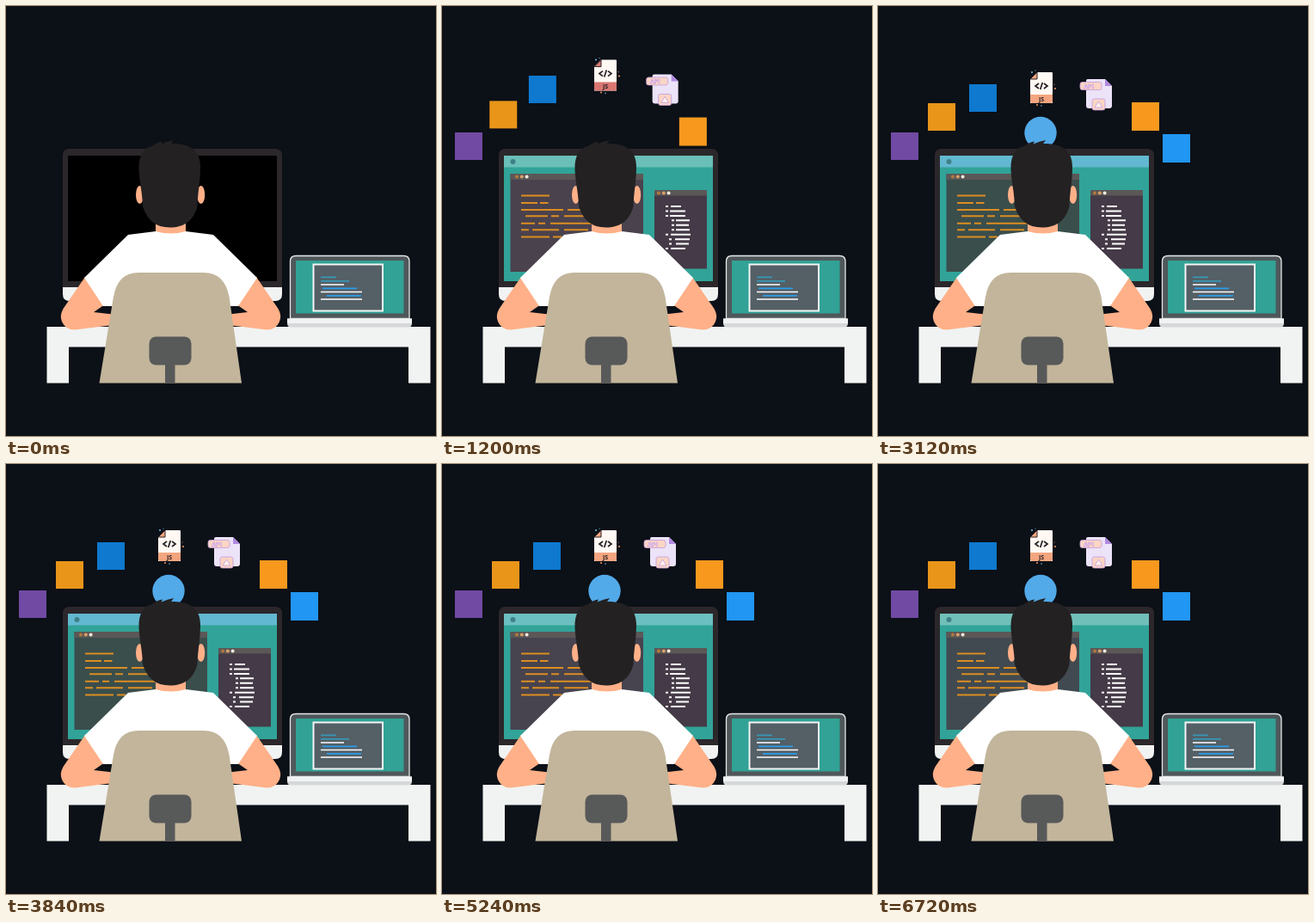
Write an HTML page that moves like this. It is 500 px wide and 500 px high and loops after 6.76 s.

```html
<!DOCTYPE html>
<html lang="en">
<head>
<meta charset="utf-8">
<title>Developer at a desk</title>
<style>
  html, body { margin: 0; width: 100%; height: 100%; overflow: hidden; background: #0c1017; }
  svg { display: block; width: 100%; height: 100%; }
  text { font-family: "Open Sans", Arial, sans-serif; font-weight: 700; text-anchor: middle; }
</style>
</head>
<body>
<svg viewBox="0 0 500 500">
  <rect width="500" height="500" fill="#0c1017"/>

  <!-- Icons, drawn around their own centres -->
  <g id="icons">
    <rect x="-16" y="-16" width="32" height="32" fill="#704aa3"/>
    <rect x="-16" y="-16" width="32" height="32" fill="#e89519"/>
    <rect x="-16" y="-16" width="32" height="32" fill="#0e79cf"/>
    <g>
      <path d="M-5 -18H12Q13 -18 13 -17V18H-13V-10Z" fill="#fff8f3"/>
      <path class="accent" d="M-5 -18V-10H-13Z" stroke="#252124" stroke-width="1"/>
      <path class="accent" d="M-13 8H13V16Q13 18 11 18H-11Q-13 18 -13 16Z"/>
      <path d="M-3 -5L-7 -2L-3 1M3 -5L7 -2L3 1M1.3 -6L-1.3 2" fill="none" stroke="#252124" stroke-width="1.7"/>
      <text y="15.8" font-size="7" fill="#252124">JS</text>
      <g fill="#f29b6c">
        <circle cx="16" cy="1" r="1"/><circle cx="-5" cy="20" r="1"/><circle cx="15" cy="-4" r=".6"/>
      </g>
      <g fill="#71c4e6">
        <circle cx="-11" cy="-18" r="1"/><circle cx="-7" cy="-20" r=".6"/><circle cx="0" cy="21" r=".8"/>
      </g>
    </g>
    <g>
      <path d="M-12 -18H8L16 -10V13Q16 16 13 16H-11Q-14 16 -14 13V-16Q-14 -18 -12 -18Z" fill="#ece3f8"/>
      <path d="M8 -18V-10H16Z" fill="#b18ae0"/>
      <g fill="#fbd5c5" stroke="#c39bdf" stroke-width=".8">
        <rect x="-21" y="-14.5" width="25" height="9" rx="2.5"/>
        <rect x="-7" y="5" width="15" height="13" rx="2.5"/>
        <path d="M.5 8L5 15H-4Z" fill="#fff1ec"/>
      </g>
      <text x="-11" y="-7.3" font-size="7" fill="#fff5ff" stroke="#b884d8" stroke-width=".5">API</text>
    </g>
    <rect x="-16" y="-17" width="32" height="33" fill="#f8991e"/>
    <rect x="-16" y="-17" width="32" height="33" fill="#2196f3"/>
    <circle r="18.7" fill="#52aae9"/>
  </g>

  <!-- Monitor -->
  <path d="M66 326H321V335Q321 343 313 343H74Q66 343 66 335Z" fill="#f1f3f3"/>
  <path d="M66 327V174Q66 166 74 166H313Q321 166 321 174V327Z" fill="#2b272a"/>
  <rect x="72" y="174" width="243" height="146" fill="#000"/>
  <g id="screen">
    <rect x="72" y="174" width="243" height="146" fill="#31a398"/>
    <rect id="bar" x="72" y="174" width="243" height="13.5"/>
    <circle cx="82.5" cy="181" r="3" fill="#3f8087"/>
  </g>
  <g id="windows">
    <rect id="editor" x="79.5" y="195" width="154.5" height="114"/>
    <rect x="79.5" y="195" width="154.5" height="7" fill="#5b5757"/>
    <rect x="247" y="214" width="61" height="91.5" fill="#453a47"/>
    <rect x="247" y="214" width="61" height="6.5" fill="#5b5757"/>
    <path id="code" stroke="#dc8d20" stroke-width="2"/>
    <path id="list" stroke="#fff" stroke-width="2"/>
    <g id="dots"></g>
  </g>

  <!-- Desk -->
  <path d="M47.5 373H493.5V438.500H468V396.500H73V438.500H47.500Z" fill="#f1f3f2"/>

  <!-- Laptop -->
  <path d="M330.500 363.500V297Q330.500 290.500 337 290.500H462.500Q469 290.500 469 297V363.500Z" fill="#50575b" stroke="#e6e9e9" stroke-width="1.3"/>
  <rect x="337" y="296" width="125.500" height="61.500" fill="#31a295"/>
  <rect x="357.500" y="300.500" width="80.500" height="54" fill="#545f66" stroke="#f3f5f5" stroke-width="2"/>
  <path d="M327 363.500H472V369Q472 373.500 467 373.500H332Q327 373.500 327 369Z" fill="#d5d8d9"/>
  <rect x="327" y="363.500" width="145" height="5.500" fill="#f1f3f3"/>
  <g stroke-width="1.700">
    <path d="M366 315.300H384M366 319.800H399" stroke="#3896b4"/>
    <path d="M366 324H393M366 332.500H414M366 341H414" stroke="#fff"/>
    <path d="M368 328.300H408M373 336.800H413" stroke="#2b9ce8"/>
  </g>

  <!-- Person -->
  <g fill="#ffb088">
    <path id="arm" d="M92 315L66.500 352Q62 360 65 367Q69 376.500 80 376.500L124 371V358.500L102 356L115 347Z"/>
    <use href="#arm" transform="translate(383 0) scale(-1 1)"/>
    <path d="M174 242H209V268H174Z"/>
    <ellipse cx="155.500" cy="219.500" rx="4.500" ry="10.500"/>
    <ellipse cx="226.700" cy="219.500" rx="4.500" ry="10.500"/>
  </g>
  <path d="M142 266L174 262Q191.500 267 209 262L241 266L292 316L270 349H113L91 316Z" fill="#fff"/>
  <path d="M154.500 190C154 174 160 165 170 163Q176 158 182 157.500L180.500 160.500Q188 157 195 156L192 160C212 160 226 166 226 187C226 204 223 216 222.500 233C218 250 207 257.500 190.500 257.500C174 257.500 164 249 159 233C158.500 216 155 204 154.500 190Z" fill="#232122"/>

  <!-- Chair -->
  <path d="M108.500 438.500L125 338Q130 310 154 310H230Q254 310 259.500 338L274 438.500Z" fill="#c2b59b"/>
  <rect x="166.500" y="384.500" width="49" height="33" rx="8" fill="#585959"/>
  <rect x="185" y="416" width="11.500" height="22.500" fill="#585959"/>
</svg>
<script>
const LOOP = 6760, TICK = 40;
const FLIGHT = 800, FIRST = 385, STAGGER = 121;
const HOME = [190, 240];
// Resting place and launch slot of each icon
const RESTS = [
  [31, 163, 0], [74, 129, 1], [122, 107, 2], [190, 95, 3],
  [256, 103, 4], [311, 129, 5], [347, 166, 6], [189, 147.500, 8]
];
// Start time, editor and bar tints
const TINTS = [
  [0, "#4a424d", "#6abfb9"],
  [1440, "#4b434e", "#61c4c4"],
  [2800, "#3a4e4c", "#62b8d0"],
  [4840, "#47434f", "#6cbfc0"],
  [6200, "#414a50", "#70c0b9"]
];
const $ = id => document.getElementById(id);
const clamp = x => Math.max(0, Math.min(1, x));
const icons = [...$("icons").children];
const accents = document.querySelectorAll(".accent");

// Rows are [y, x1, x2, x1, x2, ...]
const dashes = rows => rows.map(([y, ...xs]) =>
  xs.map((x, i) => (i % 2 ? "H" + x : `M${x} ${y}`)).join("")).join("");

$("code").setAttribute("d", dashes([
  [220.500, 92, 125], [229, 92, 111, 114, 123.500],
  [237, 92, 141, 146, 168], [244.300, 97, 123, 127, 136, 142, 170],
  [252.800, 92, 108, 112, 120, 126, 175], [260.300, 92, 101, 105, 136, 142, 170],
  [268.500, 92, 125, 129, 139]
]));
$("list").setAttribute("d", dashes([
  [260, 266, 278], [260, 265, 283], [260, 265, 283], [267, 272, 288], [267, 272, 287],
  [267, 272, 288], [260, 266, 289], [264, 271, 288], [264, 272, 287], [260, 266, 283]
].map(([a, b, c], i) => [233 + i * 5.450, a, a + 3, b, c])));
$("dots").innerHTML = [[87, 198.500], [252, 217.500]].map(([x, y]) =>
  ["#b27a3d", "#d8a067", "#f4e9dc"].map((c, i) =>
    `<circle cx="${x + i * 5.800}" cy="${y}" r="2" fill="${c}"/>`).join("")).join("");

function backOut(t) {
  const k = 1.70158, u = t - 1;
  return 1 + (k + 1) * u ** 3 + k * u ** 2;
}

function draw(now) {
  const t = Math.floor(now % LOOP / TICK) * TICK;
  icons.forEach((icon, i) => {
    const [x, y, slot] = RESTS[i];
    const p = backOut(clamp((t - FIRST - slot * STAGGER) / FLIGHT));
    icon.setAttribute("transform",
      `translate(${HOME[0] + (x - HOME[0]) * p} ${HOME[1] + (y - HOME[1]) * p})`);
  });
  $("screen").setAttribute("opacity", clamp((t - 40) / 280));
  $("windows").setAttribute("opacity", clamp((t - 200) / 280));
  const [, editor, bar] = TINTS.filter(s => s[0] <= t).pop();
  $("editor").setAttribute("fill", editor);
  $("bar").setAttribute("fill", bar);
  accents.forEach(a => a.setAttribute("fill", t < 1440 ? "#d97672" : "#f4a57f"));
}

function frame() {
  draw(performance.now());
  requestAnimationFrame(frame);
}
frame();
</script>
</body>
</html>
```
